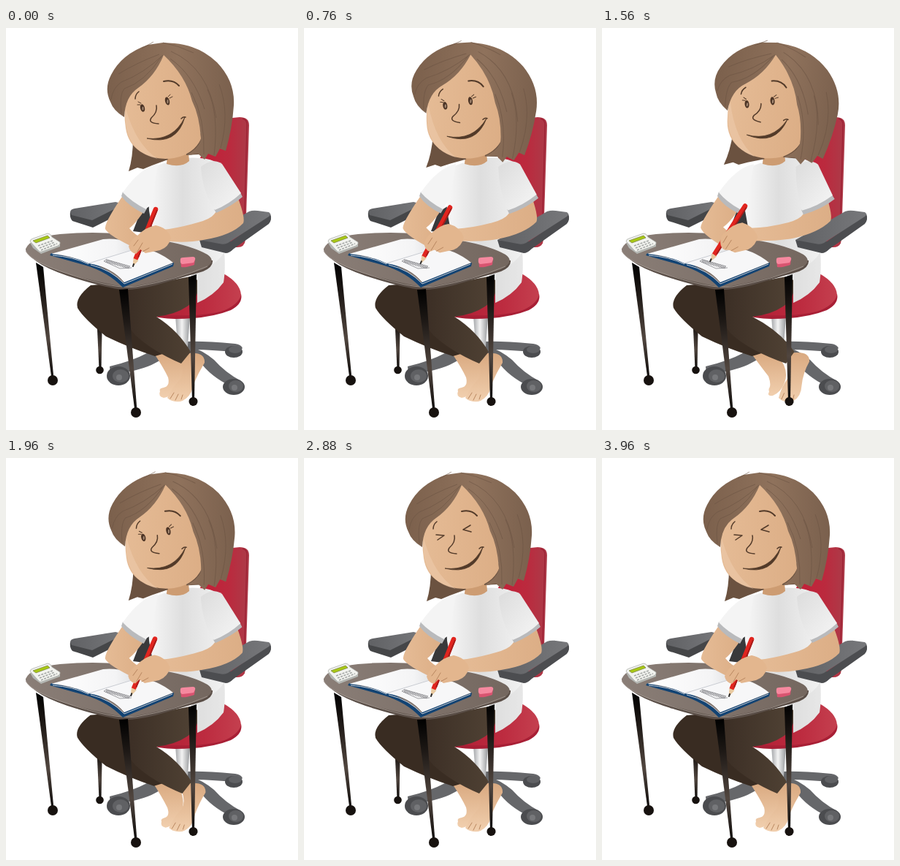
These frames come from a looping animation (400x550 px, 4160 ms). An HTML page:

```html
<!DOCTYPE html>
<html lang="en">
<head>
<meta charset="utf-8">
<title>Girl writing at a desk</title>
<style>
html, body { margin: 0; width: 100%; height: 100%; overflow: hidden; background: #fff; }
svg { display: block; width: 400px; height: 550px; }
.line { fill: none; stroke: #523a29; stroke-width: 1.5; stroke-linecap: round; stroke-linejoin: round; }
.strand { fill: none; stroke: #6b5443; stroke-width: 1; opacity: .6; }
</style>
</head>
<body>
<svg viewBox="0 0 400 550">
<defs>
  <linearGradient id="red"><stop offset="0" stop-color="#c41e36"/><stop offset=".6" stop-color="#bb2a3e"/><stop offset="1" stop-color="#ab3c49"/></linearGradient>
  <linearGradient id="seat"><stop offset="0" stop-color="#b01e34"/><stop offset=".6" stop-color="#bd2c40"/><stop offset="1" stop-color="#c4404f"/></linearGradient>
  <linearGradient id="cloth"><stop offset="0" stop-color="#f8f8f8"/><stop offset=".45" stop-color="#dedede"/><stop offset="1" stop-color="#f2f2f2"/></linearGradient>
  <linearGradient id="sleeve" x2="1" y2="1"><stop offset="0" stop-color="#dcdcdc"/><stop offset="1" stop-color="#f6f6f6"/></linearGradient>
  <linearGradient id="skin"><stop offset="0" stop-color="#e5bb95"/><stop offset="1" stop-color="#dcae86"/></linearGradient>
  <linearGradient id="foot" x2="0" y2="1"><stop offset="0" stop-color="#d9a980"/><stop offset="1" stop-color="#f1cfae"/></linearGradient>
  <linearGradient id="hair"><stop offset="0" stop-color="#7b604c"/><stop offset=".55" stop-color="#8f725c"/><stop offset="1" stop-color="#7a604d"/></linearGradient>
  <linearGradient id="wood"><stop offset="0" stop-color="#8a7e77"/><stop offset="1" stop-color="#74675f"/></linearGradient>
  <linearGradient id="metal"><stop offset="0" stop-color="#a5a7aa"/><stop offset=".45" stop-color="#f4f4f4"/><stop offset="1" stop-color="#96989b"/></linearGradient>
  <linearGradient id="pants"><stop offset="0" stop-color="#3a2d24"/><stop offset="1" stop-color="#514335"/></linearGradient>
  <linearGradient id="leg" x2="0" y2="1"><stop offset="0" stop-color="#000"/><stop offset=".25" stop-color="#1c1714"/><stop offset=".65" stop-color="#51463f"/><stop offset="1" stop-color="#0b0908"/></linearGradient>
  <linearGradient id="page"><stop offset="0" stop-color="#fff"/><stop offset=".7" stop-color="#f4f4f5"/><stop offset="1" stop-color="#d8dadd"/></linearGradient>
  <linearGradient id="rest"><stop offset="0" stop-color="#606164"/><stop offset="1" stop-color="#77787b"/></linearGradient>
</defs>

<!-- chair -->
<path fill="url(#red)" d="M290 125L320 122Q333 122 333 133L328 290Q327 300 317 300L285 300L265 180Z"/>
<path fill="none" stroke="#9c1f33" stroke-width="1.3" d="M324 124Q331 125 330 135L326 290"/>
<g fill="#66676a">
  <path d="M248 429Q270 428 314 432Q322 433 324 438L318 444Q285 440 248 440Z"/>
  <path d="M252 436Q268 440 285 454Q300 471 322 483L314 493Q285 480 270 462Q260 450 244 446Z"/>
  <path d="M238 434Q213 436 195 444Q172 456 142 463L143 474Q186 469 205 458Q222 448 244 446Z"/>
</g>
<g fill="#4b4c4f">
  <ellipse cx="312" cy="443" rx="12" ry="8"/><ellipse cx="312" cy="491" rx="15" ry="11"/><ellipse cx="154" cy="476" rx="16" ry="13"/>
</g>
<g fill="#606164">
  <ellipse cx="314" cy="440" rx="9" ry="5"/><ellipse cx="315" cy="490" rx="10" ry="8"/><ellipse cx="157" cy="476" rx="11" ry="9"/>
</g>
<g fill="#77787b"><circle cx="313" cy="492" r="4"/><circle cx="155" cy="478" r="4"/></g>
<path fill="url(#metal)" d="M232 394H252L249 436Q240 439 235 434Z"/>
<path fill="#a81f35" d="M203 389Q250 392 290 378L322 364Q325 377 308 386Q278 398 232 398Q208 397 203 394Z"/>
<path fill="url(#seat)" d="M298 336Q321 349 322 365Q318 380 294 388Q262 396 203 392L206 380L262 360Z"/>
<path fill="#454648" d="M88 252L160 241L157 252L139 263L119 273L91 264Q87 260 88 252Z"/>
<path fill="url(#rest)" d="M88 252Q88 248 94 247L150 238L162 241L138 253L118 263L90 256Z"/>
<path fill="#39393b" d="M184 252L198 243L205 282L174 278Z"/>

<!-- legs -->
<path fill="url(#leg)" d="M124 390H132L130.500 466H127.500Z"/><circle cx="128.500" cy="468" r="5.300" fill="#17120f"/>
<path id="backFoot" fill="url(#foot)"/>
<path id="backPants" fill="#392c22"/>
<path id="frontFoot" fill="url(#foot)"/>
<path id="toes" class="line" style="stroke:#b98760;stroke-width:1"/>
<path id="frontPants" fill="url(#pants)"/>

<!-- body -->
<path fill="url(#cloth)" d="M194 200Q198 189 221 184Q240 176 266 178Q297 180 300 202L292 262L299 305Q301 330 298 348Q285 366 262 376L262 345L205 300L196 250Z"/>
<path fill="#d0d0d0" d="M264 335Q290 322 299 307Q301 330 298 348Q285 366 262 376Z" opacity=".35"/>
<path fill="#cd9c72" d="M222 160H249L251 182Q240 192 220 186Z"/>
<path fill="#4c4d50" d="M265 290L268 300L301 308Q306 308 312 302L360 268Q365 262 362 254L308 292Z"/>
<path fill="url(#rest)" d="M265 290L333 251Q338 249 345 250L360 252Q364 254 360 258L304 294Q299 297 292 295Z"/>

<!-- desk -->
<path fill="#5a4e47" d="M27 302Q35 325 100 344Q140 356 160 358Q176 359 205 352L270 333Q284 327 283 318Z"/>
<path fill="url(#wood)" d="M27 302Q34 286 74 282Q140 276 190 287Q250 295 276 310Q290 320 270 330Q220 346 172 354Q160 355 140 350Q62 334 36 315Q26 308 27 302Z"/>
<path fill="none" stroke="#a69c95" stroke-width=".8" d="M27 305Q36 320 78 334Q148 358 178 354Q235 344 276 326"/>
<path fill="#124373" d="M60 311L110 325Q140 334 160 355L229 326L230 321L160 348Q140 330 113 319L62 308Z"/>
<path fill="url(#page)" d="M62 309L133 289Q165 286 188 305L113 322Q90 311 62 309Z"/>
<path fill="#f7f7f8" d="M113 322L180 301Q205 302 229 321L162 348Q145 327 113 322Z"/>
<path fill="none" stroke="#c9ccd2" d="M113 322L182 301M64 311Q92 313 113 323M116 324Q145 331 162 350L228 323"/>
<path id="scribble" fill="none" stroke="#77787c" stroke-width=".7"/>
<g transform="translate(1 2)">
  <path fill="#b5b8b4" d="M32 292L36 299L47 307L73 297L73 293Z"/>
  <path fill="#f2f3ef" d="M32 290Q32 287 36 286L56 279Q60 279 62 284L73 291Q74 294 70 296L48 304Q45 305 43 302Z" stroke="#a4a7a3" stroke-width=".7"/>
  <path fill="#a9c916" d="M36 289L56 282L59 285L40 292Z" stroke="#717a38" stroke-width=".7"/>
  <path fill="none" stroke="#a3a6a4" stroke-width="1.6" stroke-dasharray="3 1.500" d="M43 296L63 289M45 299L66 291M47 302L69 293"/>
</g>
<path fill="#d85470" d="M239 317L240 327Q246 328 258 324L259 316Z"/>
<path fill="#f5899f" d="M239 316Q239 314 243 314L256 313Q260 313 259 317L257 321L242 323Q238 323 239 316Z"/>

<!-- arms -->
<path id="leftArm" fill="url(#skin)"/>
<path id="leftCuff" fill="#b9babc"/>
<path id="leftSleeve" fill="#f4f4f4"/>
<path id="rightArm" fill="url(#skin)"/>
<path id="rightCuff" fill="#b9babc"/>
<path id="rightSleeve" fill="url(#sleeve)"/>
<path id="pencil" stroke="#e1251f" stroke-width="6.500" stroke-linecap="round"/>
<path id="shade" stroke="#a51b19" stroke-width="1.800"/>
<path id="wedge" fill="#e9c9a0"/>
<path id="lead" stroke="#2b2b2b" stroke-width="2" stroke-linecap="round"/>
<path id="hand" fill="#e3b68e"/>
<path id="fingers" class="line" style="stroke:#b98760;stroke-width:1"/>

<!-- front desk legs -->
<g fill="url(#leg)">
  <path d="M41 321L51 327L65.500 480H62.500Z"/><path d="M155 358L167 357L179.500 524H176.500Z"/><path d="M250 341L261 337L258 509H255Z"/>
</g>
<g fill="#17120f"><circle cx="64" cy="482" r="7"/><circle cx="178" cy="526" r="7"/><circle cx="256.500" cy="511" r="6"/></g>

<!-- head -->
<g id="head">
  <path fill="#6b5240" d="M174 150Q174 177 168 196L180 191L188 193L200 188L222 180L212 165Z"/>
  <path fill="#6b5240" d="M250 140L290 150L280 172L247 174Z"/>
  <path fill="url(#skin)" d="M166 84Q160 112 164 137Q167 158 184 169Q204 182 230 178Q257 173 267 152Q268 90 216 34Q196 60 166 84Z"/>
  <path fill="#efceb0" opacity=".5" d="M164 110Q160 150 184 169Q194 176 208 179Q178 160 164 110Z"/>
  <path fill="url(#hair)" d="M216 37Q204 66 181 82Q163 94 162 122Q147 113 143 101Q134 83 144 64Q158 36 194 23L215 20L231 21Q265 24 289 47Q314 73 312 106Q310 137 301 168L293 165L287 176L277 172L272 180L263 172L247 174Q266 163 267 151Q265 120 255 100Q246 65 216 37Z"/>
  <g class="strand">
    <path d="M215 37Q189 62 158 74Q146 82 144 98M213 39Q190 74 162 83Q155 91 158 117M210 36Q178 48 154 63M225 42Q257 64 272 111M226 32Q277 54 288 123M254 88Q273 124 271 173M276 84Q292 119 285 174M292 77Q307 116 294 164M215 20Q236 24 257 34M186 28L202 19"/>
  </g>
  <path class="line" d="M177 97Q177 91 182 87M206 106Q208 115 199 123Q194 130 209 131M240 124Q243 121 246 122"/>
  <path class="line" style="stroke-width:2" d="M216 73Q229 70 237 79"/>
  <path fill="#523a29" d="M193 151Q229 155 245 122Q234 161 193 151Z" stroke="#523a29" stroke-width=".8"/>
  <g id="open">
    <ellipse cx="187" cy="109.500" rx="3" ry="5.300" fill="#4c3425" transform="rotate(-15 187 109.500)"/>
    <ellipse cx="221" cy="100" rx="3" ry="5.600" fill="#4c3425" transform="rotate(-15 221 100)"/>
    <ellipse cx="187.500" cy="110" rx="1.100" ry="2.600" fill="#a58a74"/><ellipse cx="221.500" cy="100.500" rx="1.100" ry="2.800" fill="#a58a74"/>
    <path class="line" style="stroke-width:1" d="M184 105L180 105M185 103L181 101M222 94L225 91M224 96L228 94"/>
  </g>
  <path id="closed" class="line" d="M181 105L192 106L183 112M228 92L218 98L229 101"/>
</g>
</svg>

<script>
const $ = id => document.getElementById(id);
const moving = [];

// One far pose serves every swing; legs list theirs for the second and third.
const part = (id, rest, ...far) => moving.push({ el: $(id), rest, far });

const mix = (a, b, u) => {
  const to = b.match(/-?[\d.]+/g);
  let i = 0;
  return a.replace(/-?[\d.]+/g, n => (+n + (to[i++] - n) * u).toFixed(2));
};

part('leftArm',
  'M161 228L190 249Q178 267 169 274Q176 283 188 288L181 303Q140 284 136 275Q134 267 161 228Z',
  'M161 228L186 248Q176 264 165 272Q172 278 180 285L166 301Q138 283 135 273Q134 267 161 228Z');
part('leftCuff', 'M160 224Q172 237 193 247L189 254Q168 244 158 230Z', 'M160 224Q170 237 189 247L185 253Q166 244 158 230Z');
part('leftSleeve',
  'M208 186Q184 191 160 225Q172 238 192 248L201 231Z',
  'M208 186Q184 191 160 225Q170 238 188 248L200 231Z');
part('rightArm',
  'M289 248L318 233Q328 260 325 267Q309 284 270 290Q245 295 214 291L214 276Q235 274 263 266Q286 260 289 248Z',
  'M275 248L306 235Q312 257 309 263Q292 279 259 287Q235 291 200 291L200 273Q225 273 253 266Q274 260 275 248Z');
part('rightCuff', 'M285 248Q304 241 321 225L324 231Q309 244 288 253Z', 'M269 249Q291 245 313 229L317 235Q299 249 272 256Z');
part('rightSleeve',
  'M267 190Q283 177 296 186L322 226Q306 241 286 249Q269 224 267 190Z',
  'M265 190Q283 177 296 187L314 230Q292 245 270 250Q264 222 265 190Z');

part('pencil', 'M205 248L178 315', 'M193 242L146 308');
part('shade', 'M207 249L181 314', 'M195 244L149 308');
part('wedge', 'M174.500 315L173.500 327L181.500 318Z', 'M143 306L139 318L149 311Z');
part('lead', 'M174 326L175 323', 'M139.500 317L141 314');
part('hand',
  'M180 284Q192 272 205 270Q221 273 226 287Q223 300 211 304L191 308L184 303L178 309Q170 307 168 299Q171 289 180 284Z',
  'M165 278Q175 267 188 265Q203 270 209 285Q207 297 196 303L179 307L171 304L165 302Q160 300 160 290Q160 282 165 278Z');
part('fingers', 'M181 290L175 298M187 294L180 306M196 301L187 306', 'M168 283L163 292M174 289L166 301M183 299L174 304');

const still = 0;
part('backFoot',
  'M202 444L236 446Q248 468 239 486Q230 504 216 506Q208 504 211 497Q209 493 216 492Q225 490 222 478Q216 465 202 444Z',
  still,
  'M204 444L240 446Q260 466 254 484Q251 496 240 502Q231 504 235 498Q234 494 234 492Q234 486 230 476Q220 465 204 444Z',
  'M187 439L222 440Q238 463 252 481Q256 494 248 502Q241 509 236 501Q234 508 231 496Q226 490 210 482Q199 467 187 439Z');
part('backPants',
  'M116 352Q94 369 98 383Q106 397 137 422Q170 438 204 449L235 440L205 395L200 345Z',
  still,
  'M116 352Q94 369 98 383Q106 397 137 422Q170 438 206 449L235 440L205 395L200 345Z',
  'M111 350Q91 364 95 374Q104 390 138 417Q165 438 188 447L222 435L205 395L200 345Z');
part('frontFoot',
  'M239 455L251 445Q273 443 272 458Q264 471 257 487Q254 506 239 511Q226 512 221 506Q229 490 239 480Q245 470 239 455Z',
  still,
  'M257 455L266 444Q289 442 288 456Q279 472 279 490Q279 506 267 511Q255 513 249 506Q251 492 259 480Q264 470 257 455Z');
part('toes', 'M225 507L230 499M232 509L236 501M240 508L242 502', still, 'M253 508L256 500M261 510L263 502M269 508L270 502');
part('frontPants',
  'M263 338Q268 368 248 381Q232 392 206 395Q236 414 253 443L240 459Q200 442 176 419Q155 394 160 358Z',
  still,
  'M263 338Q268 368 248 381Q232 392 206 395Q246 414 267 443L256 459Q204 442 178 419Q155 394 160 358Z',
  'M263 338Q268 368 248 381Q232 392 206 395Q244 408 267 441L258 458Q212 447 180 424Q152 394 156 356Z');

let hatch = 'M134 319';
for (let i = 0; i < 15; i++) hatch += `L${138 + i * 2.2} ${316.500 + i * .7}L${137 + i * 2.2} ${321 + i * .6}`;
$('scribble').setAttribute('d', hatch + 'M134 319L156 329L172 328M138 317L170 326');

const LOOP = 4160, STEP = 40, SWING = 960, REST = 2880;

// Steady out and back once per swing, then at rest.
const lean = t => t < REST ? 1 - Math.abs(t % SWING / (SWING / 2) - 1) : 0;
const isShut = t => t >= 2880 && t < 3080 || t >= 3280 && t < 3480 || t >= 3960;

function draw(now) {
  const t = Math.floor(now % LOOP / STEP) * STEP;
  const u = lean(t), swing = Math.floor(t / SWING);
  for (const { el, rest, far } of moving) {
    const end = far[Math.min(swing, far.length - 1)] || rest;
    el.setAttribute('d', mix(rest, end, u));
  }
  $('head').setAttribute('transform', `rotate(${11.4 * u} 228 184)`);
  $('open').style.display = isShut(t) ? 'none' : '';
  $('closed').style.display = isShut(t) ? '' : 'none';
}

const start = performance.now();
const tick = () => { draw(performance.now() - start); requestAnimationFrame(tick); };
tick();
</script>
</body>
</html>
```
